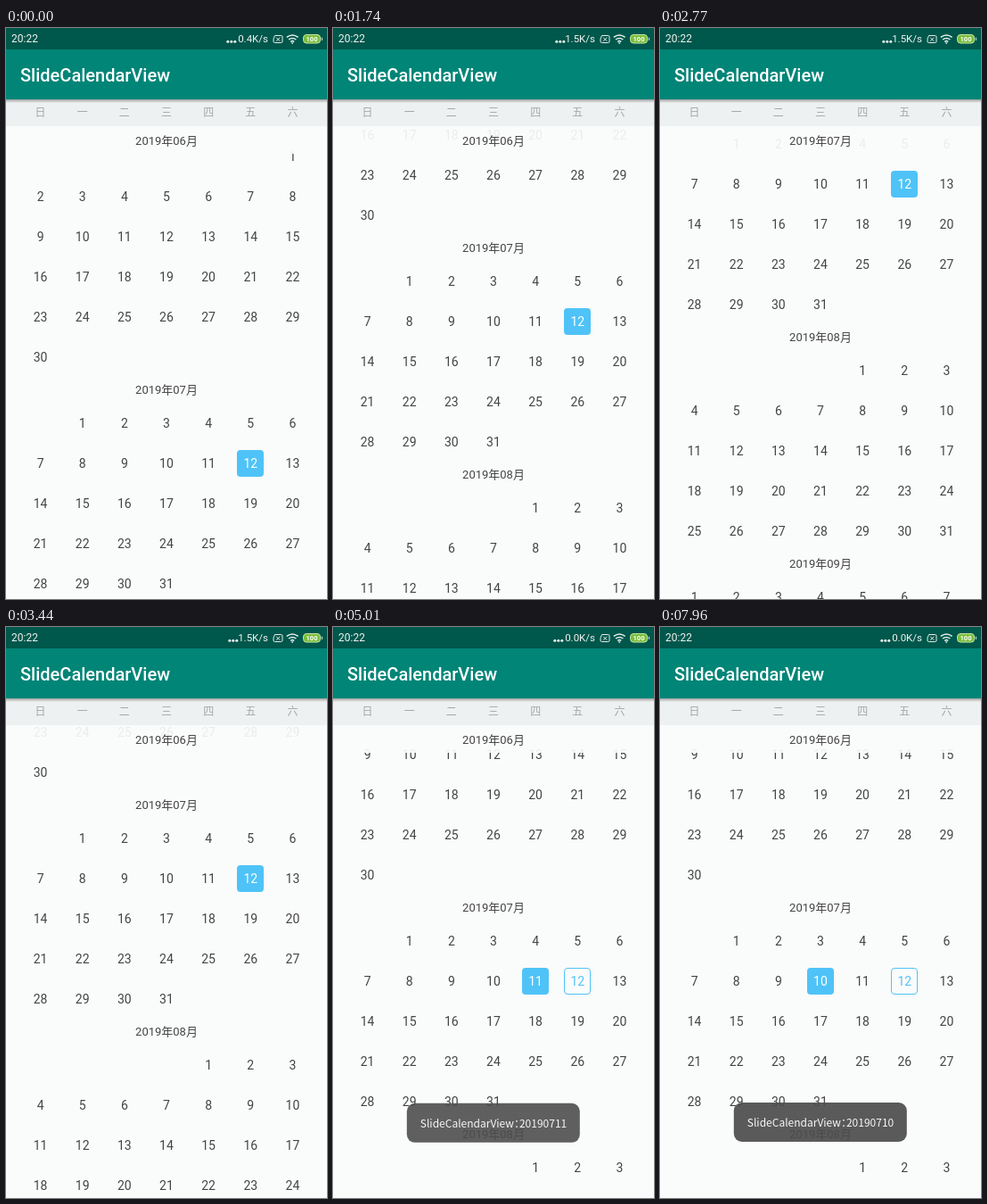
Animation of 360 by 640 pixels, one loop 7990 ms. Source, as an HTML page:

```html
<!DOCTYPE html>
<html lang="zh-CN">
<head>
<meta charset="utf-8">
<title>SlideCalendarView</title>
<style>
html, body { margin: 0; width: 100%; height: 100%; overflow: hidden; }
#app {
  position: relative; width: 360px; height: 640px; overflow: hidden;
  background: #fafbfb; color: #444;
  font: 14px/45px Roboto, "Noto Sans CJK SC", sans-serif;
}
#app > * { position: absolute; }
#status { left: 0; top: 0; width: 360px; height: 24px; background: #00574b; color: #eef4f2; font-size: 12px; line-height: 25px; }
#status > * { position: absolute; }
#clock { left: 6px; }
#speed { right: 66px; font-size: 11.5px; }
#icons { left: 0; top: 0; }
#bar {
  left: 0; top: 24px; width: 344px; height: 56px; padding-left: 16px; background: #008577;
  color: #fff; font-size: 20px; font-weight: 500; line-height: 58px; z-index: 1;
}
#bar::after { content: ""; position: absolute; left: 0; top: 56px; width: 360px; height: 4px; background: linear-gradient(#0005, #0000); }
#week { left: 0; top: 80px; width: 330px; height: 30px; padding: 0 15px; background: #eef1f1; color: #a6a8a8; font-size: 12px; line-height: 31px; }
.grid { display: grid; grid-template-columns: repeat(7, 1fr); text-align: center; }
#list { left: 0; top: 112px; width: 360px; height: 528px; overflow: hidden; }
.month {
  position: sticky; top: 0; height: 29px; font-size: 13px; line-height: 29px; text-align: center;
  background: #fafbfbeb; box-shadow: 0 -2px #fafbfbeb; z-index: 1;
}
.days { padding: 0 15px; grid-auto-rows: 45px; }
.days span { width: 30px; height: 30px; line-height: 30px; margin: 8px auto 7px; border-radius: 4px; box-sizing: border-box; }
.days .today { border: 1px solid #4fc3f7; line-height: 28px; color: #4fc3f7; }
.days .picked { border: 0; line-height: 30px; background: #4fc3f7; color: #fff; }
#toast {
  left: 50%; top: 533px; height: 44px; padding: 0 15px; border-radius: 9px; white-space: nowrap;
  background: #4c4c4cea; color: #f8f8f8; z-index: 2;
  font: 300 12px/44px "Noto Sans CJK SC", "Noto Sans", sans-serif; font-feature-settings: "halt";
}
</style>
</head>
<body>
<div id="app">
  <div id="status">
    <span id="clock">20:22</span>
    <span id="speed"></span>
    <svg id="icons" width="360" height="24" fill="none" stroke="#e4eeec">
      <g id="dots" fill="#eef4f2" stroke="none">
        <circle cx="248.8" cy="15.3" r="1.5"/><circle cx="252.8" cy="15.3" r="1.5"/><circle cx="256.8" cy="15.3" r="1.5"/>
      </g>
      <path d="M301.5 8.5h7q1.5 0 1.5 1.5v5q0 1.5-1.5 1.5h-7q-1.5 0-1.5-1.5v-3zM303.2 10.7l4 4m0-4l-4 4"/>
      <path d="M314.8 10.4q6.4-5 12.8 0M317 13q4.2-3.2 8.4 0M319.2 15.3q2-1.5 4 0" stroke-width="1.5"/>
      <circle cx="321.2" cy="16.8" r=".7"/>
      <rect x="333.5" y="7.5" width="19" height="9.5" rx="3.5" fill="#78bd3c" stroke="#c8e6a4"/>
      <path d="M354.3 10.7v3.2"/>
      <text x="343" y="15" fill="#fff" stroke="none" font-size="7.5" font-weight="700" text-anchor="middle">100</text>
    </svg>
  </div>
  <div id="bar">SlideCalendarView</div>
  <div id="week" class="grid"></div>
  <div id="list"></div>
  <div id="toast"></div>
</div>
<script>
const $ = id => document.getElementById(id);
const LOOP = 7990;
const pad = n => String(n).padStart(2, "0");

$("week").innerHTML = [..."日一二三四五六"].map(d => `<span>${d}</span>`).join("");

// [month, weekday of the 1st, number of days]
$("list").innerHTML = [[6, 6, 30], [7, 1, 31], [8, 4, 31], [9, 0, 30]].map(([m, first, count]) => {
  let days = "";
  for (let d = 1; d <= count; d++)
    days += `<span id="d${m}-${d}"${d == 1 ? ` style="grid-column:${first + 1}"` : ""}>${d}</span>`;
  return `<section><div class="month">2019年${pad(m)}月</div><div class="days grid">${days}</div></section>`;
}).join("");
$("d7-12").classList.add("today");

// Drag path: [time, scroll, speed per ms]
const drag = [[530, 20, 0], [1740, 179, .14], [2770, 333, 0], [3440, 226, -.17], [4080, 111, 0]];

function scrollAt(t) {
  if (t <= drag[0][0]) return drag[0][1];
  const i = drag.findIndex(k => k[0] > t);
  if (i < 0) return drag[drag.length - 1][1];
  const [t0, y0, v0] = drag[i - 1], [t1, y1, v1] = drag[i];
  const w = t1 - t0, u = (t - t0) / w, r = 1 - u;
  return r * r * ((1 + 2 * u) * y0 + u * w * v0) + u * u * ((3 - 2 * u) * y1 - r * w * v1);
}

const ramp = (t, start, len) => {
  const u = Math.min(1, Math.max(0, (t - start) / len));
  return 1 - (1 - u) ** 2;
};

const TAP1 = 4800, TAP2 = 7200;

function draw(t) {
  $("list").scrollTop = Math.round(scrollAt(t));

  const day = t < TAP1 ? 12 : t < TAP2 ? 11 : 10;
  for (const d of [10, 11, 12]) $("d7-" + d).classList.toggle("picked", d == day);

  const speed = t < 1000 ? "0.4" : t < 5000 ? "1.5" : "0.0";
  $("speed").textContent = speed + "K/s";
  $("dots").setAttribute("transform", `translate(${speed == "1.5" ? 2 : 0})`);

  const shown = t < TAP2 ? ramp(t, TAP1, 250) - ramp(t, 6650, 250) : ramp(t, TAP2, 250);
  const toast = $("toast");
  toast.textContent = "SlideCalendarView：201907" + day;
  toast.style.opacity = shown;
  toast.style.transform = `translate(-50%, ${32 * (1 - shown)}px)`;
}

let start;
function tick(now) {
  start ??= now;
  draw((now - start) % LOOP);
  requestAnimationFrame(tick);
}
draw(0);
requestAnimationFrame(tick);
</script>
</body>
</html>
```
